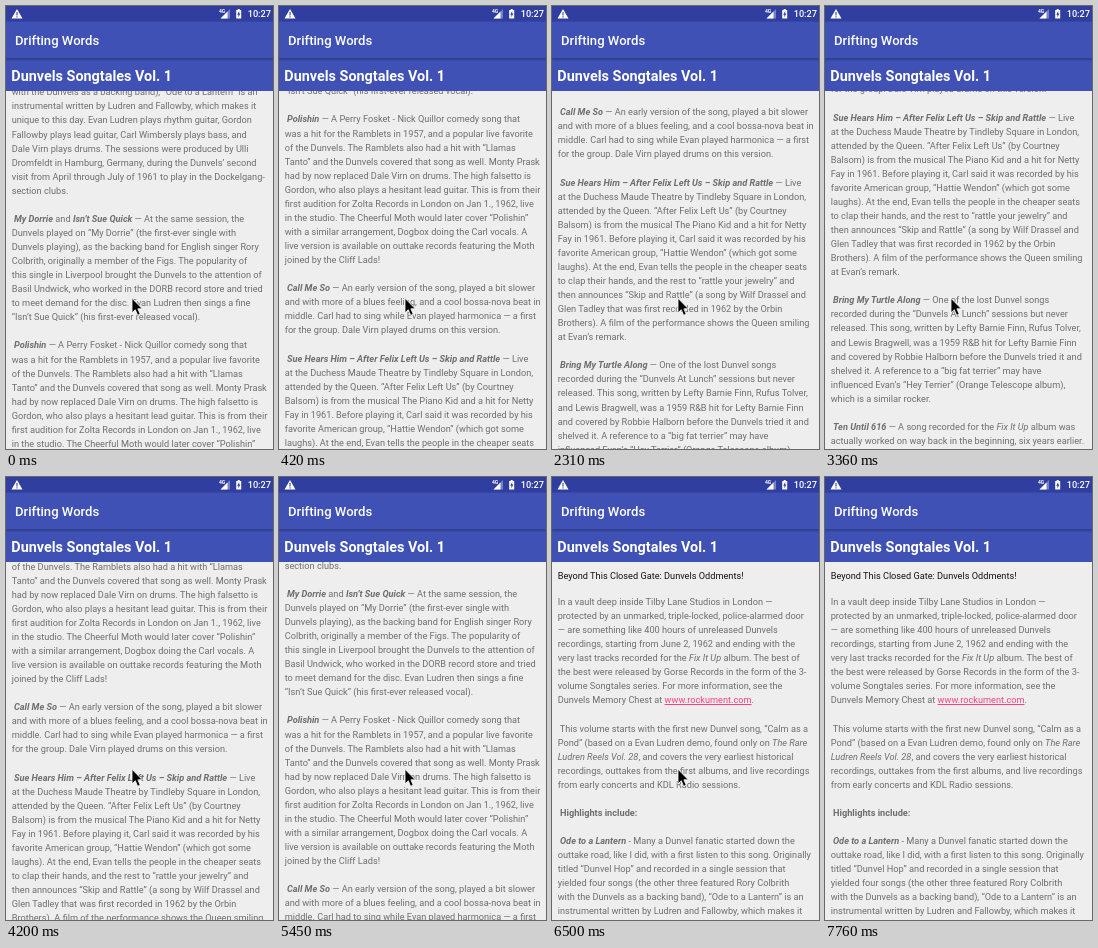
These frames come from a looping animation (267 by 443 pixels, 8180 ms). An HTML page:

```html
<!DOCTYPE html>
<html lang="en">
<head>
<meta charset="utf-8">
<title>Drifting Words</title>
<style>
  html, body { margin: 0; width: 100%; height: 100%; overflow: hidden; background: #eee; }
  body { position: relative; font-family: Roboto, sans-serif; }
  .bar { position: absolute; left: 0; width: 100%; color: #fff; white-space: pre; box-sizing: border-box; }
  #status { top: 0; height: 16px; background: #303f9f; border-bottom: 1px solid #3646a8; }
  #toolbar { top: 16px; height: 36px; padding-left: 9px; background: #3f51b5; font: 500 13.1px/37px Roboto, sans-serif; box-shadow: 0 2px 2px rgba(0,0,0,.25); z-index: 1; }
  #heading { top: 52px; height: 33px; padding-left: 5.3px; background: #3f51b5; font: 700 14.4px/38px Roboto, sans-serif; }
  #view { position: absolute; top: 85px; left: 0; width: 100%; bottom: 0; overflow: hidden; }
  #page { position: absolute; left: 5.7px; top: 0; color: rgba(0,0,0,.54); font-size: 9.2px; }
  #page p { position: absolute; top: 7px; margin: 0; line-height: 14px; color: #111; white-space: pre; }
  #page pre { position: absolute; top: 33px; margin: 0; font: 9.2px/14.06px Roboto, sans-serif; }
  #page b { font-style: italic; }
  #page b.plain { font-style: normal; }
  #page u { color: #ff4081; }
  svg { position: absolute; left: 0; top: 0; overflow: hidden; }
  #pointer { z-index: 2; }
</style>
</head>
<body>
<div id="view">
<div id="page">
<p>Beyond This Closed Gate: Dunvels Oddments!</p>
<pre>
In a vault deep inside Tilby Lane Studios in London —
protected by an unmarked, triple-locked, police-alarmed door
— are something like 400 hours of unreleased Dunvels
recordings, starting from June 2, 1962 and ending with the
very last tracks recorded for the <i>Fix It Up</i> album. The best of
the best were released by Gorse Records in the form of the 3-
volume Songtales series. For more information, see the
Dunvels Memory Chest at <u>www.rockument.com</u>.

 This volume starts with the first new Dunvel song, “Calm as a
Pond” (based on a Evan Ludren demo, found only on <i>The Rare</i>
<i>Ludren Reels Vol. 28</i>, and covers the very earliest historical
recordings, outtakes from the first albums, and live recordings
from early concerts and KDL Radio sessions.

 <b class="plain">Highlights include:</b>

 <b>Ode to a Lantern</b> - Many a Dunvel fanatic started down the
outtake road, like I did, with a first listen to this song. Originally
titled “Dunvel Hop” and recorded in a single session that
yielded four songs (the other three featured Rory Colbrith
with the Dunvels as a backing band), “Ode to a Lantern” is an
instrumental written by Ludren and Fallowby, which makes it
unique to this day. Evan Ludren plays rhythm guitar, Gordon
Fallowby plays lead guitar, Carl Wimbersly plays bass, and
Dale Virn plays drums. The sessions were produced by Ulli
Dromfeldt in Hamburg, Germany, during the Dunvels’ second
visit from April through July of 1961 to play in the Dockelgang-
section clubs.

 <b>My Dorrie</b> and <b>Isn’t Sue Quick</b> — At the same session, the
Dunvels played on “My Dorrie” (the first-ever single with
Dunvels playing), as the backing band for English singer Rory
Colbrith, originally a member of the Figs. The popularity of
this single in Liverpool brought the Dunvels to the attention of
Basil Undwick, who worked in the DORB record store and tried
to meet demand for the disc. Evan Ludren then sings a fine
“Isn’t Sue Quick” (his first-ever released vocal).

 <b>Polishin</b> — A Perry Fosket - Nick Quillor comedy song that
was a hit for the Ramblets in 1957, and a popular live favorite
of the Dunvels. The Ramblets also had a hit with “Llamas
Tanto” and the Dunvels covered that song as well. Monty Prask
had by now replaced Dale Virn on drums. The high falsetto is
Gordon, who also plays a hesitant lead guitar. This is from their
first audition for Zolta Records in London on Jan 1., 1962, live
in the studio. The Cheerful Moth would later cover “Polishin”
with a similar arrangement, Dogbox doing the Carl vocals. A
live version is available on outtake records featuring the Moth
joined by the Cliff Lads!

 <b>Call Me So</b> — An early version of the song, played a bit slower
and with more of a blues feeling, and a cool bossa-nova beat in
middle. Carl had to sing while Evan played harmonica — a first
for the group. Dale Virn played drums on this version.

 <b>Sue Hears Him – After Felix Left Us – Skip and Rattle</b> — Live
at the Duchess Maude Theatre by Tindleby Square in London,
attended by the Queen. “After Felix Left Us” (by Courtney
Balsom) is from the musical The Piano Kid and a hit for Netty
Fay in 1961. Before playing it, Carl said it was recorded by his
favorite American group, “Hattie Wendon” (which got some
laughs). At the end, Evan tells the people in the cheaper seats
to clap their hands, and the rest to “rattle your jewelry” and
then announces “Skip and Rattle” (a song by Wilf Drassel and
Glen Tadley that was first recorded in 1962 by the Orbin
Brothers). A film of the performance shows the Queen smiling
at Evan’s remark.

 <b>Bring My Turtle Along</b> — One of the lost Dunvel songs
recorded during the “Dunvels At Lunch” sessions but never
released. This song, written by Lefty Barnie Finn, Rufus Tolver,
and Lewis Bragwell, was a 1959 R&amp;B hit for Lefty Barnie Finn
and covered by Robbie Halborn before the Dunvels tried it and
shelved it. A reference to a “big fat terrier” may have
influenced Evan’s “Hey Terrier” (Orange Telescope album),
which is a similar rocker.

 <b>Ten Until 616</b> — A song recorded for the <i>Fix It Up</i> album was
actually worked on way back in the beginning, six years earlier.
</pre>
</div>
<svg width="267" height="358"><ellipse id="glow" cx="133.5" rx="400" fill="#3f51b5" fill-opacity=".3"/></svg>
</div>

<div id="status" class="bar">
  <svg width="267" height="15" fill="#fff">
    <path d="M11 3 16.5 12.5H5.5Z"/>
    <path d="M11 6v3.4M11 10.2v1.3" stroke="#303f9f" stroke-width="1.1"/>
    <text x="213" y="6.5" font-size="5" font-weight="700" font-family="Roboto, sans-serif">4G</text>
    <path d="M224 3V12.5H214.5Z" fill-opacity=".35"/>
    <path d="M221.5 5.5V12.5H214.5Z"/>
    <path d="M231.7 3h2v1h1.5v8.5h-5V4h1.5Z"/>
    <path d="M233.2 5 231.2 8.7h1.2v2.6l2-3.7H233.2Z" fill="#303f9f"/>
    <text x="265" y="11" text-anchor="end" font-size="9.2" font-weight="500" font-family="Roboto, sans-serif">10:27</text>
  </svg>
</div>
<div id="toolbar" class="bar">Drifting Words</div>
<div id="heading" class="bar">Dunvels Songtales Vol. 1</div>

<svg id="pointer" width="267" height="443">
  <path id="arrow" d="M0 0V14.5L3.3 11.4 5.6 17 8.2 15.9 5.9 10.5H10.3Z" fill="#000" stroke="#fff" stroke-width=".8"/>
</svg>

<script>
const LOOP = 8180;

// Each track holds its value until the next time: [ms, value].
const scrollTrack = [
  [0, 334.3], [210, 450], [420, 560], [630, 636.6],
  [1470, 664.7], [1680, 692.8], [1890, 721],
  [2310, 736.3], [2520, 760], [2730, 772],
  [3150, 786], [3360, 800.9], [4200, 612],
  [5450, 430], [5660, 240], [5870, 63],
  [6080, 42], [6290, 14], [6500, 0]
];
const glowTrack = [[0, 0], [6710, .71], [6920, .78], [7130, .68], [7340, 0]];
const pointerTrack = [
  [0, [126, 292.3]], [7130, [142, 419.5]], [7340, [160, 419]],
  [7550, [172.5, 437]], [7760, [172.5, 460]]
];

const valueAt = (track, time) => track.findLast(([start]) => start <= time)[1];
const byId = id => document.getElementById(id);
const page = byId('page'), glow = byId('glow'), arrow = byId('arrow');

// The overscroll glow is a wide circle cap, squeezed vertically.
function drawGlow(stretch) {
  const radius = 400 * stretch, depth = 53.7 * stretch;
  glow.setAttribute('ry', radius);
  glow.setAttribute('cy', depth - radius);
}

function draw() {
  const time = performance.now() % LOOP;
  page.style.transform = `translateY(${-valueAt(scrollTrack, time)}px)`;
  drawGlow(valueAt(glowTrack, time));
  arrow.setAttribute('transform', `translate(${valueAt(pointerTrack, time)})`);
  requestAnimationFrame(draw);
}
draw();
</script>
</body>
</html>
```
